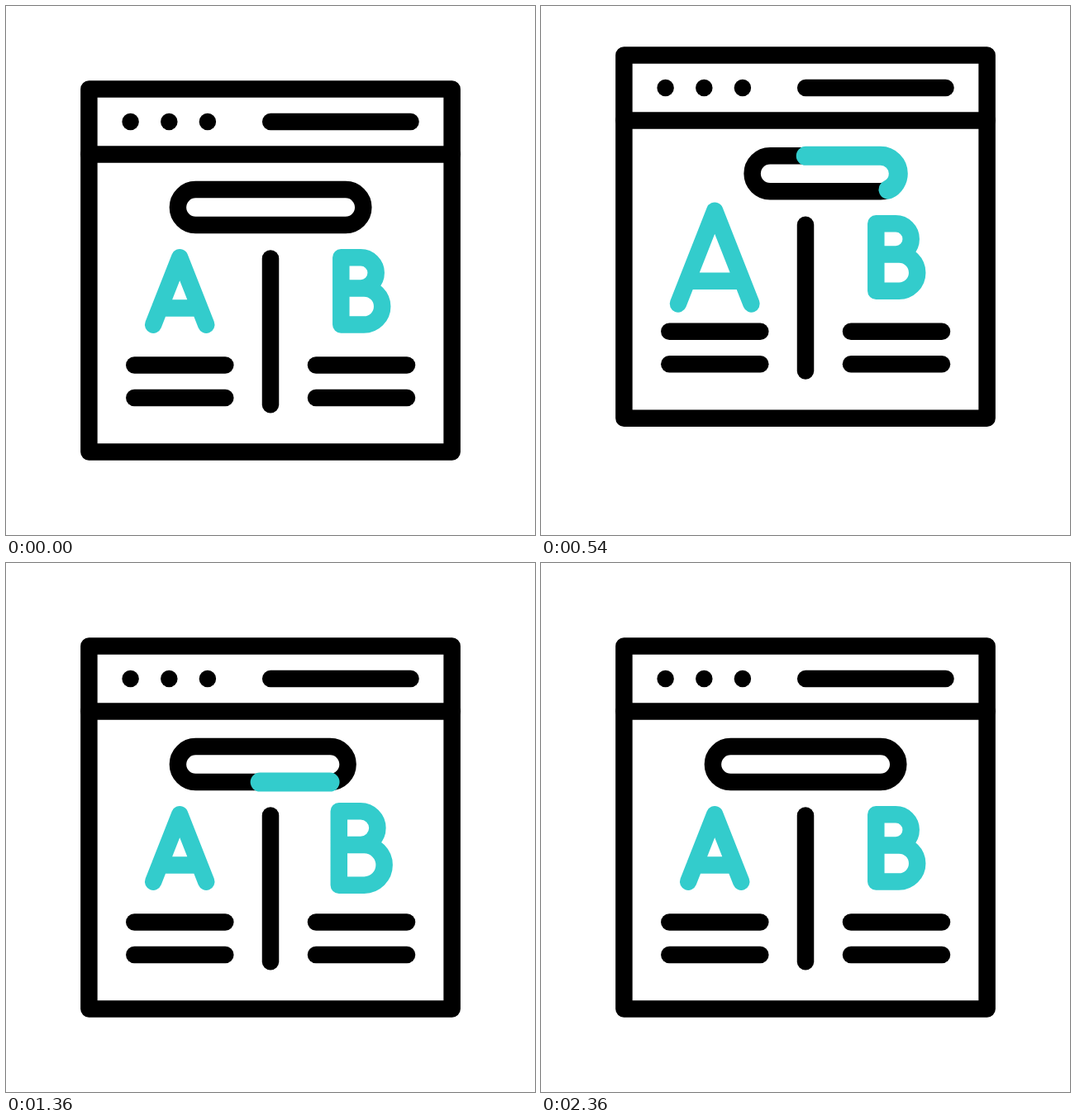
These frames come from a looping animation (640 by 640 pixels, 2400 ms). An HTML page with a canvas:

```html
<!DOCTYPE html>
<html lang="en">
<head>
<meta charset="utf-8">
<title>A/B page</title>
<style>
  html, body { margin: 0; width: 100%; height: 100%; overflow: hidden; background: #fff; }
  canvas { display: block; }
</style>
</head>
<body>
<canvas id="stage" width="640" height="640"></canvas>
<script>
const ctx = document.getElementById('stage').getContext('2d');
const BLACK = '#000', TEAL = '#33cccc';
const LOOP = 2400, STROKE = 20.5, ACCENT = 23;
const BAR_LENGTH = 110;

const smooth = x => { x = Math.min(1, Math.max(0, x)); return x * x * (3 - 2 * x); };
const ease = (t, from, to) => smooth((t - from) / (to - from));
// Grow, hold and shrink, each taking the same time.
const swell = (t, start, step) =>
  ease(t, start, start + step) - ease(t, start + 2 * step, start + 3 * step);

function hop(t) {
  const u = Math.min(4, Math.max(0, (t - 20) / 192));
  return -51 * smooth(1 - Math.abs(u % 2 - 1));
}

function stroke(path, color = BLACK, width = STROKE) {
  ctx.strokeStyle = color;
  ctx.lineWidth = width;
  ctx.stroke(path);
}

function line(x1, y1, x2, y2) {
  const path = new Path2D();
  path.moveTo(x1, y1);
  path.lineTo(x2, y2);
  return path;
}

// Teal stroke over the part of a path between two fractions of its length.
function trim(path, length, from, to) {
  if (to <= from) return;
  ctx.setLineDash([(to - from) * length, 2 * length]);
  ctx.lineDashOffset = -from * length;
  stroke(path, TEAL, ACCENT);
  ctx.setLineDash([]);
}

// The letter's outline scales, its line weight does not.
function letter(shape, cx, cy, scale) {
  const path = new Path2D();
  path.addPath(new Path2D(shape), new DOMMatrix([scale, 0, 0, scale, cx, cy]));
  stroke(path, TEAL);
}

function pill(t, growA, growB) {
  const left = 229.4 + 51 * growA, right = 410.8 - 51 * growB;
  const y = 243.6, r = 21.5;
  const path = new Path2D();
  path.moveTo(right, y + r);
  path.lineTo(left, y + r);
  path.arc(left, y, r, Math.PI / 2, Math.PI * 1.5);
  path.lineTo(right, y - r);
  path.arc(right, y, r, -Math.PI / 2, Math.PI / 2);
  path.closePath();
  stroke(path);
  const length = 2 * (right - left) + 2 * Math.PI * r;
  for (const start of [20, 1203])
    trim(path, length, ease(t, start + 192, start + 768), ease(t, start, start + 576));
}

function bars(t, x, start) {
  for (const y of [434.6, 474]) {
    const path = line(x, y, x + BAR_LENGTH, y);
    stroke(path);
    trim(path, BAR_LENGTH, ease(t, start + 196, start + 392), ease(t, start, start + 196));
  }
}

function draw(t) {
  const growA = swell(t, 230, 368), growB = swell(t, 1203, 385);
  ctx.clearRect(0, 0, 640, 640);
  ctx.save();
  ctx.translate(0, hop(t));
  ctx.lineCap = ctx.lineJoin = 'round';

  const frame = new Path2D();
  frame.rect(100.4, 100.4, 439.2, 439.2);
  stroke(frame);
  stroke(line(100.4, 179.4, 539.6, 179.4));
  stroke(line(320.2, 139.9, 489.5, 139.9));
  stroke(line(320, 305.5, 320, 482.3));
  for (const x of [150.6, 197.3, 243.9]) stroke(line(x, 139.9, x, 139.9));

  pill(t, growA, growB);
  bars(t, 155.3, 807);
  bars(t, 375, 1962);
  letter('M-32 40.7L0 -40.7L32 40.7M-24 20.7H24', 210.2, 344.9, 1 + 0.41 * growA);
  letter('M-25.3 -40.7H-1.5A18.6 18.6 0 0 1 -1.5 -3.5H-25.3H2.5A22.1 22.1 0 0 1 2.5 40.7H-25.3Z',
    430.6, 344.9, 1 + 0.27 * growB);
  ctx.restore();
}

function tick() {
  draw(performance.now() % LOOP);
  requestAnimationFrame(tick);
}
tick();
</script>
</body>
</html>
```
